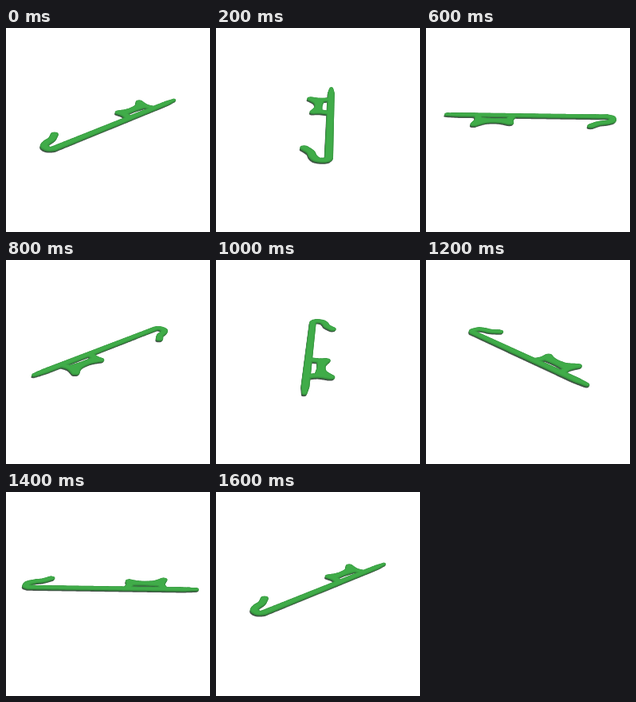
These frames come from a looping animation (256x256 px, 1.7 s). An HTML page with a canvas:

```html
<!DOCTYPE html>
<html lang="en">
<head>
<meta charset="utf-8">
<title>Turning hook</title>
<style>
  html, body { margin: 0; width: 100%; height: 100%; overflow: hidden; background: #fff; }
  canvas { display: block; width: 256px; height: 256px; }
</style>
</head>
<body>
<canvas id="stage" width="256" height="256"></canvas>
<script>
const ctx = document.getElementById('stage').getContext('2d');

const CENTER = { x: 130.2, y: 115.8 };
const TILT = 0.42;
const RISE = Math.sqrt(1 - TILT * TILT);
const CAMERA = 700;
const PEN = 4.8;
const TIP = 108;
const STEP_MS = 100;
const STEPS = 17;
const TURN = Math.PI / 8;
const START = 36.2 * Math.PI / 180;

// Smooth curve through the points, sampled about once per unit.
function curve(points) {
  const out = [];
  for (let i = 0; i < points.length - 1; i++) {
    const p1 = points[i], p2 = points[i + 1];
    const p0 = points[i - 1] || p1, p3 = points[i + 2] || p2;
    const n = Math.ceil(Math.hypot(p2[0] - p1[0], p2[1] - p1[1]));
    for (let j = 0; j <= n; j++) {
      const t = j / n;
      out.push([0, 1].map(k => 0.5 * (2 * p1[k] + (p2[k] - p0[k]) * t
        + (2 * p0[k] - 5 * p1[k] + 4 * p2[k] - p3[k]) * t * t
        + (3 * p1[k] - p0[k] - 3 * p2[k] + p3[k]) * t * t * t)));
    }
  }
  return out;
}

const shaft = curve([[TIP, 0], [-97, -25]]);
const hook = curve([[-97, -25], [-102, -22], [-102, -13], [-95, -7], [-86, -3], [-77, 6]]);
const edge = curve([[66, 23], [56, 13], [44, 9], [33, 9], [23, 12]]);
const bar = curve([[64, 8], [44, 8], [25, 5]]);
const front = curve([[66, 23], [64, 9], [68, -3]]);
const back = curve([[23, 12], [25, 2], [23, -9]]);
const dots = [...shaft, ...hook, ...edge, ...bar, ...front, ...back];
const web = [...edge, ...bar.slice().reverse()];

function project([u, v], angle) {
  const c = Math.cos(angle), s = Math.sin(angle);
  const depth = u * s + v * c;
  const scale = CAMERA / (CAMERA + RISE * depth);
  return {
    x: CENTER.x + (u * c - v * s) * scale,
    y: CENTER.y - depth * TILT * scale,
    scale
  };
}

// The shaft narrows over its last part.
const taper = u => Math.min(1, 0.6 + (TIP - u) / 40);

function layer(angle, height, pen, color, shift = 0) {
  ctx.fillStyle = color;
  ctx.beginPath();
  for (const dot of dots) {
    const { x, y, scale } = project(dot, angle);
    const r = pen * scale * taper(dot[0]);
    const left = x + shift, top = y - height * scale;
    ctx.moveTo(left + r, top);
    ctx.ellipse(left, top, r, r * TILT, 0, 0, Math.PI * 2);
  }
  ctx.fill();
  ctx.beginPath();
  for (const point of web) {
    const { x, y, scale } = project(point, angle);
    ctx.lineTo(x + shift, y - height * scale);
  }
  ctx.fill();
}

function draw(now) {
  const step = Math.floor(now / STEP_MS) % STEPS;
  const angle = START + step * TURN;
  ctx.fillStyle = '#fff';
  ctx.fillRect(0, 0, 256, 256);
  layer(angle, -1.9, PEN - 0.4, '#4b544e', -1);
  layer(angle, -1, PEN - 0.2, '#2f5f38', -0.4);
  layer(angle, -0.2, PEN, '#38923f');
  layer(angle, 0.7, PEN, '#3a9d43');
  layer(angle, 1.5, PEN - 0.8, '#3a9d43');
  layer(angle, 0.9, PEN - 1.2, '#40ac49');
}

const begin = performance.now();
function tick() {
  draw(performance.now() - begin);
  requestAnimationFrame(tick);
}
tick();
</script>
</body>
</html>
```
